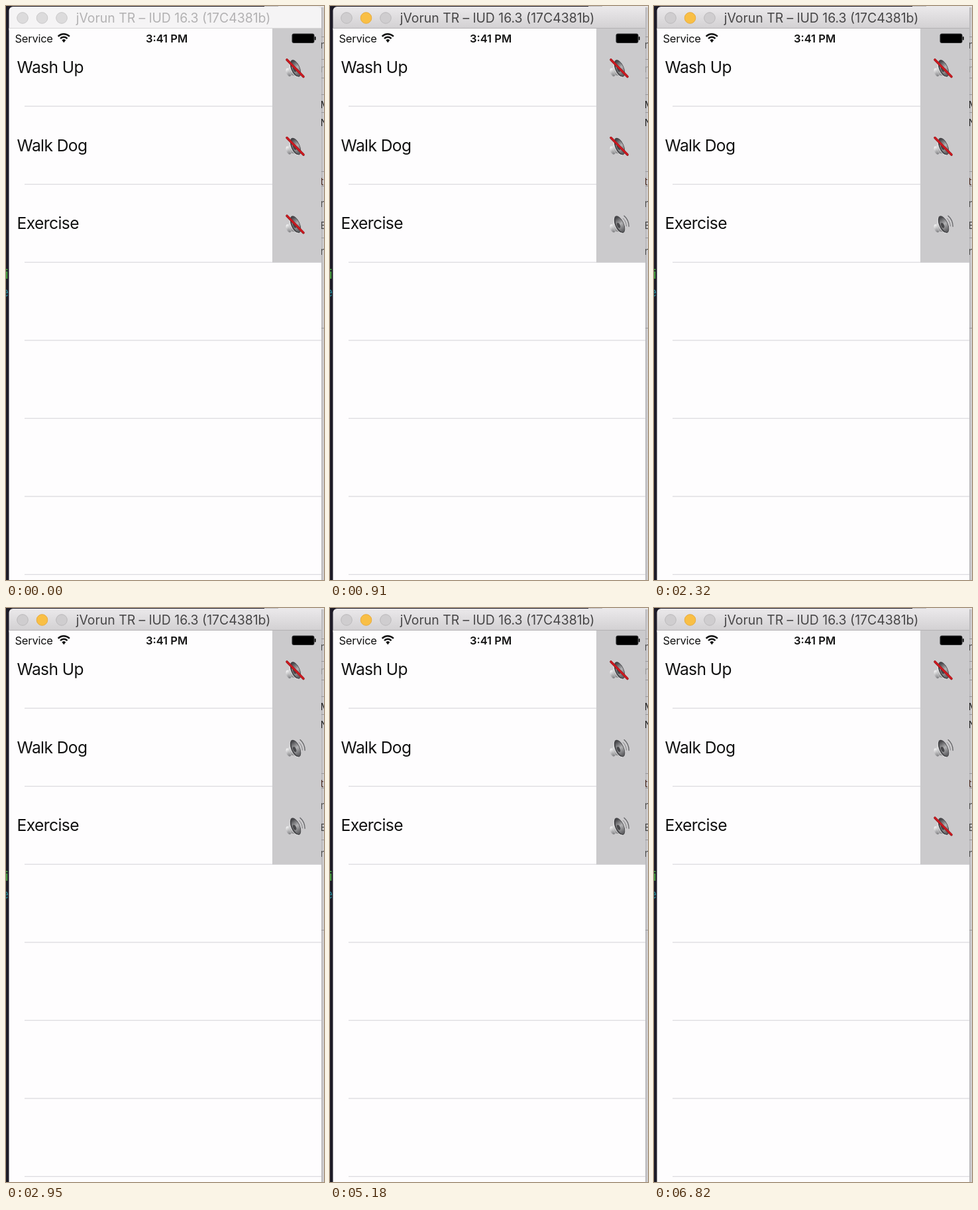
An HTML page with a canvas that plays this animation: 480 px wide and 865 px high, repeating every 6.87 s.

```html
<!DOCTYPE html>
<html lang="en">
<head>
<meta charset="utf-8">
<title>Reminders</title>
<style>
  html, body { margin: 0; width: 100%; height: 100%; overflow: hidden; }
  canvas { display: block; }
</style>
</head>
<body>
<canvas id="stage" width="480" height="865"></canvas>
<script>
const ctx = document.getElementById('stage').getContext('2d');
const LOOP = 6870, ROW = 117.6;
const FONT = 'Inter, "Open Sans", sans-serif';

// Spans of time in ms during which each row's sound is on
const rows = [
  { name: 'Wash Up', on: LOOP, off: LOOP },
  { name: 'Walk Dog', on: 2610, off: LOOP },
  { name: 'Exercise', on: 480, off: 6640 }
];

function rect(x, y, w, h, fill) {
  ctx.fillStyle = fill;
  ctx.fillRect(x, y, w, h);
}

function roundRect(x, y, w, h, r, fill) {
  ctx.beginPath();
  ctx.roundRect(x, y, w, h, r);
  ctx.fillStyle = fill;
  ctx.fill();
}

function text(s, x, y, size, fill, { weight = 400, align = 'left', spacing = 0 } = {}) {
  ctx.font = `${weight} ${size}px ${FONT}`;
  ctx.letterSpacing = spacing + 'px';
  ctx.textAlign = align;
  ctx.fillStyle = fill;
  ctx.fillText(s, x, y);
}

function stroke(color, width, path) {
  ctx.beginPath();
  path();
  ctx.strokeStyle = color;
  ctx.lineWidth = width;
  ctx.stroke();
}

function ellipse(x, y, rx, ry, tilt, fill) {
  ctx.beginPath();
  ctx.ellipse(x, y, rx, ry, tilt, 0, Math.PI * 2);
  ctx.fillStyle = fill;
  ctx.fill();
}

function gradient(x0, y0, x1, y1, ...colors) {
  const g = ctx.createLinearGradient(x0, y0, x1, y1);
  colors.forEach((c, i) => g.addColorStop(i / (colors.length - 1), c));
  return g;
}

function backdrop() {
  rect(0, 0, 480, 865, '#1d1b27');
  rect(390, 0, 90, 865, '#e9e8ea');
  rect(390, 0, 21, 2, '#bdbcbf');
  text('i', -1, 411, 19, '#4fbd45');
  text('e', -7, 438, 19, '#24808f');
  rect(476, 2, 4, 863, gradient(476, 0, 480, 0, '#b4b3b6', '#d8d7da'));
  for (const y of [46, 80, 108, 133, 160, 249, 271, 349, 485]) rect(476, y, 4, 1, '#98979a');
  const scraps = [['n', 64, '#444'], ['r', 100, '#999'], ['M', 154, '#222'], ['N', 181, '#222'],
    ['t', 270, '#4a2a20'], ['n', 303, '#444'], ['E', 336, '#444'], ['n', 375, '#444']];
  for (const [s, y, fill] of scraps) text(s, 474.5, y, 15, fill);
}

function titleBar(active) {
  roundRect(4.5, 1, 471.5, 40, 6, active ? gradient(0, 1, 0, 33, '#ebe9eb', '#d3d1d3') : '#f5f4f5');
  rect(4.5, 33, 471.5, 1, active ? '#b4b2b4' : '#d6d5d6');
  [25, 54.5, 84].forEach((x, i) => {
    const amber = active && i === 1;
    ellipse(x, 18, 8.5, 8.5, 0, amber ? '#f9bf45' : active ? '#cfcdcf' : '#dcdbdc');
    stroke(amber ? '#e6ad45' : active ? '#bdbbbd' : '#cbcacb', 1,
      () => ctx.arc(x, 18, 8.3, 0, Math.PI * 2));
  });
  text('jVorun TR – lUD 16.3 (17C4381b)', 252.5, 25, 19.4, active ? '#474647' : '#b3b2b3',
    { align: 'center' });
}

function statusBar() {
  text('Service', 13.5, 55, 16.5, '#111', { spacing: -0.25 });
  text('3:41 PM', 242.5, 55, 16.5, '#111', { weight: 600, align: 'center' });
  for (const r of [7.2, 11.8]) {
    stroke('#111', 2.4, () => ctx.arc(87.3, 54, r, -Math.PI * 0.76, -Math.PI * 0.24));
  }
  ctx.beginPath();
  ctx.moveTo(87.3, 55.3);
  ctx.arc(87.3, 54, 3.8, -Math.PI * 0.78, -Math.PI * 0.22);
  ctx.fillStyle = '#111';
  ctx.fill();
  roundRect(431.5, 41.5, 34, 14.5, 3, '#2c2c2e');
  roundRect(432.5, 42.5, 32, 12.5, 2, '#000');
  roundRect(465.8, 46, 1.8, 5.5, 1, '#000');
}

function speaker(y, on) {
  ctx.save();
  ctx.translate(436, y);
  ctx.lineCap = 'round';
  // Magnet and basket
  ellipse(-9.5, 6, 3.4, 6.5, -0.4, gradient(-13, 0, -6, 10, '#ffffff', '#858588'));
  ctx.beginPath();
  ctx.moveTo(-10, 1);
  ctx.lineTo(-4, -12);
  ctx.lineTo(7, 12);
  ctx.lineTo(-7, 10);
  ctx.fillStyle = gradient(-11, 0, 4, 6, '#f0f0f1', '#5c5c5f');
  ctx.fill();
  // Cone
  ellipse(1, 0, 6.6, 13.8, -0.42, '#454548');
  ellipse(1.6, 0, 5.3, 12.2, -0.42, gradient(-5, -9, 7, 9, '#4a4a4d', '#b2b2b4', '#626265'));
  ellipse(-0.4, 1.5, 2.3, 4.2, -0.42, '#48484b');
  stroke('#e2e2e3', 1, () => ctx.ellipse(0.4, 0.4, 6.8, 13.8, -0.42, 1.7, 4.3));
  if (on) {
    stroke('#808083', 1, () => {
      ctx.moveTo(6.5, -9);
      ctx.quadraticCurveTo(11, -4.5, 11.5, 2.5);
    });
    stroke('#626265', 1.3, () => {
      ctx.moveTo(8, -13);
      ctx.quadraticCurveTo(15, -7, 15.2, 3);
    });
  } else {
    stroke('#8e1a1e', 3.6, () => { ctx.moveTo(-12, -13); ctx.lineTo(13, 12.5); });
    stroke('#d0181f', 2.4, () => { ctx.moveTo(-12, -13.2); ctx.lineTo(13, 12.3); });
  }
  ctx.restore();
}

function draw(t) {
  backdrop();
  titleBar(t >= 50);
  rect(4.5, 34, 471.5, 831, '#fefdfe');
  for (let i = 0; i < 7; i++) rect(28, 150.4 + i * ROW, 448, 1.3, '#dddce0');
  rect(402, 34, 74, 352.5, '#cbcacc');
  statusBar();
  rows.forEach(({ name, on, off }, i) => {
    text(name, 16.5, 101 + i * ROW, 24.6, '#111', { spacing: -0.6 });
    speaker(94 + i * ROW, t >= on && t < off);
  });
}

const start = performance.now();
function tick() {
  draw((performance.now() - start) % LOOP);
  requestAnimationFrame(tick);
}
tick();
</script>
</body>
</html>
```
